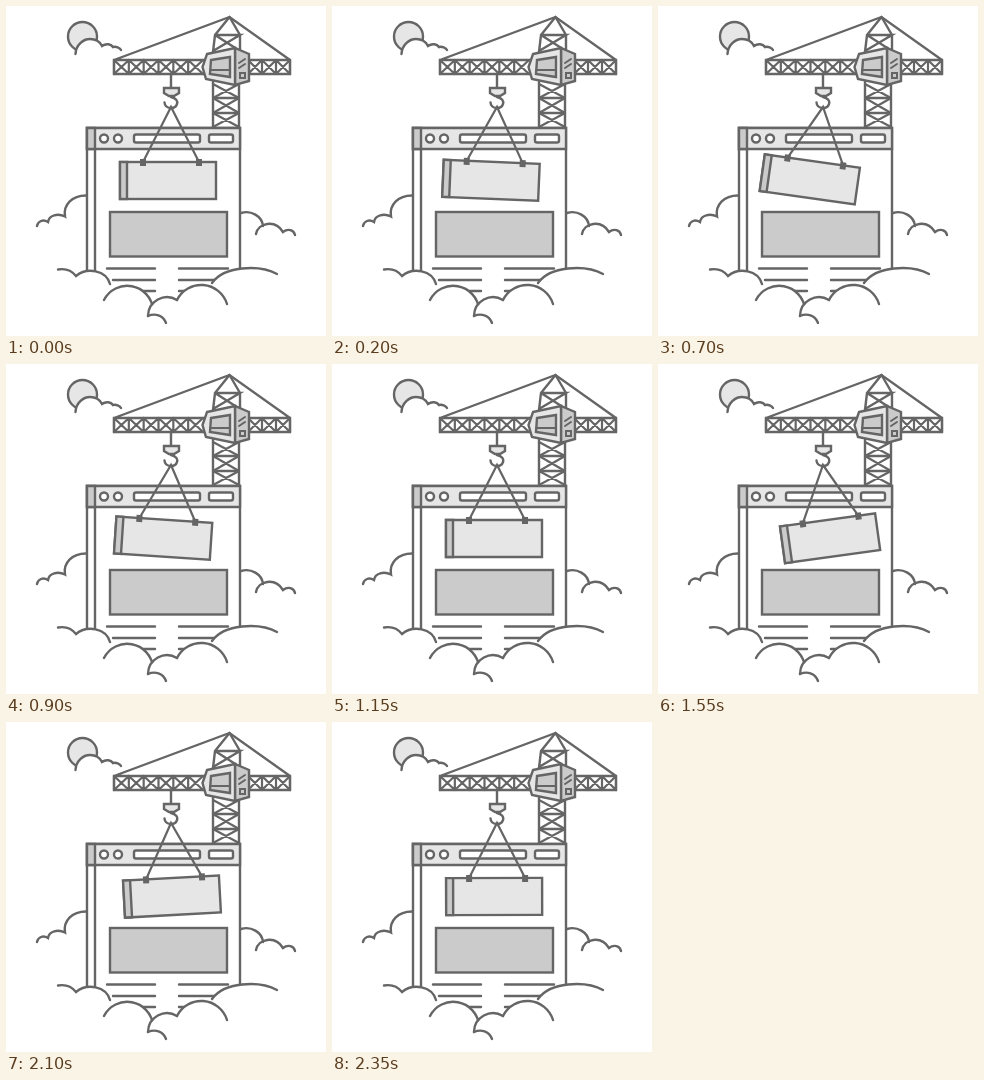
Animation, 320 px wide and 330 px high, one loop 2.4 s. Source, as an HTML page:

```html
<!DOCTYPE html>
<html>
<head>
<meta charset="utf-8">
<style>
html, body { margin: 0; height: 100%; overflow: hidden; background: #fff; }
svg { display: block; }
.light { fill: #e6e6e6; }
.mid { fill: #cbcbcb; }
.white { fill: #fff; }
.ink { fill: #656565; }
</style>
</head>
<body>
<svg width="320" height="330" viewBox="0 0 320 330" fill="none" stroke="#656565" stroke-width="2.4" stroke-linecap="round">
  <!-- sun and its cloud -->
  <circle class="light" cx="76.500" cy="30.500" r="14.500"/>
  <path class="white" stroke="none" d="M69.500 48C70 39 77 33 84 33C90 33 94 36 96 40V49Z"/>
  <path d="M69.500 48C70 39 77 33 84 33C90 33 94 36 96 40C100 37 105 38 107 41C110 40 114 42 115 44"/>

  <!-- crane -->
  <path d="M108 54L223.500 11L284 54M108 54H284V68H108Z"/>
  <path d="M223.500 11L209 29L207 46M223.500 11L234 29V46M209 29H234L207 45M209 29L234 45"/>
  <path id="lattice" stroke-width="2.2"/>
  <path d="M207 76V121M233 76V121M207 92H233M207 107H233"/>
  <path class="mid" d="M229 42L243 48V75L229 79Z"/>
  <path class="light" d="M201 48L229 42V79L200 73L196.500 61Z"/>
  <path class="mid" d="M205 54L224 51V71L204 68Z"/>
  <path d="M204 64H224M233 57L239 53M233 62L239 58M234 67H239V72H234Z" stroke-width="2"/>

  <!-- browser window -->
  <path class="white" d="M81 265V122H234V265"/>
  <path class="light" d="M81 122H234V143H81Z"/>
  <path class="mid" d="M81 122H89V143H81Z"/>
  <path d="M89 143V265"/>
  <g class="white">
    <circle cx="98" cy="132.500" r="4"/>
    <circle cx="112" cy="132.500" r="4"/>
    <rect x="128" y="128.500" width="66" height="8" rx="2"/>
    <rect x="203" y="128.500" width="24" height="8" rx="2"/>
  </g>
  <rect class="mid" x="104" y="206" width="117" height="44.500"/>
  <path d="M101 262.500H149M107 274H149M125 285H149M173 262.500H222M173 274H216M173 285H202"/>

  <!-- clouds -->
  <path d="M31 220C32 215 37 213 42 216C43 209 52 207 59 210.500C57 199 66 189.500 80 189.500"/>
  <path d="M235 207C245 204 256 210 257 220M250 228C252 217 269 213 277 226C282 222 288 224 289 229"/>
  <g class="white">
    <path d="M52 263.500C60 262 66 265 70 270C81 261 100 264 104 278"/>
    <path d="M206 277C211 270 221 264 236 262.500C250 261 262 263 271 268"/>
    <path d="M98 294A26 26 0 0 1 147 303"/>
    <path d="M142 310A19 19 0 0 1 171 294"/>
    <path d="M171 294A27 27 0 0 1 221 298"/>
  </g>
  <path d="M142 310C149 307 157 309 160 317"/>

  <!-- hook -->
  <path d="M165 68V82M165 91C170 92 172 95 171 98C169 104 159 103 158.500 96.500"/>
  <path class="light" d="M158 82H173V87L168 90H163L158 87Z"/>

  <g id="load">
    <path d="M137 156L165 101L193 156" stroke-width="2.2"/>
    <rect class="light" x="114" y="156" width="96" height="37"/>
    <rect class="mid" x="114" y="156" width="7" height="37"/>
    <path class="ink" stroke="none" d="M134 153h6v7h-6ZM190 153h6v7h-6Z"/>
  </g>
</svg>
<script>
const LOOP = 2400, STEP = 50;
// [time in ms, angle in degrees]
const swing = [[0, 0], [590, 8.9], [1155, 0], [1650, -8.8], [LOOP, 0]];
const load = document.getElementById('load');

const cross = (x0, y0, x1, y1) => `M${x0} ${y0}L${x1} ${y1}M${x1} ${y0}L${x0} ${y1}`;

function jib(from, to, count) {
  const width = (to - from) / count;
  let d = '';
  for (let i = 0; i < count; i++) {
    const x = from + i * width;
    d += cross(x, 54, x + width, 68) + `M${x} 54V68`;
  }
  return d;
}

document.getElementById('lattice').setAttribute('d',
  jib(108, 197, 6) + jib(284, 242, 3) +
  cross(207, 78, 233, 92) + cross(207, 92, 233, 107) + cross(207, 107, 233, 121));

function angleAt(time) {
  const i = swing.findIndex(key => key[0] > time);
  const [t0, a0] = swing[i - 1], [t1, a1] = swing[i];
  const p = (time - t0) / (t1 - t0);
  return a0 + (a1 - a0) * p * p * (3 - 2 * p);
}

function draw() {
  const time = Math.floor(performance.now() % LOOP / STEP) * STEP;
  load.setAttribute('transform', `rotate(${angleAt(time)} 165 101)`);
  requestAnimationFrame(draw);
}
draw();
</script>
</body>
</html>
```
